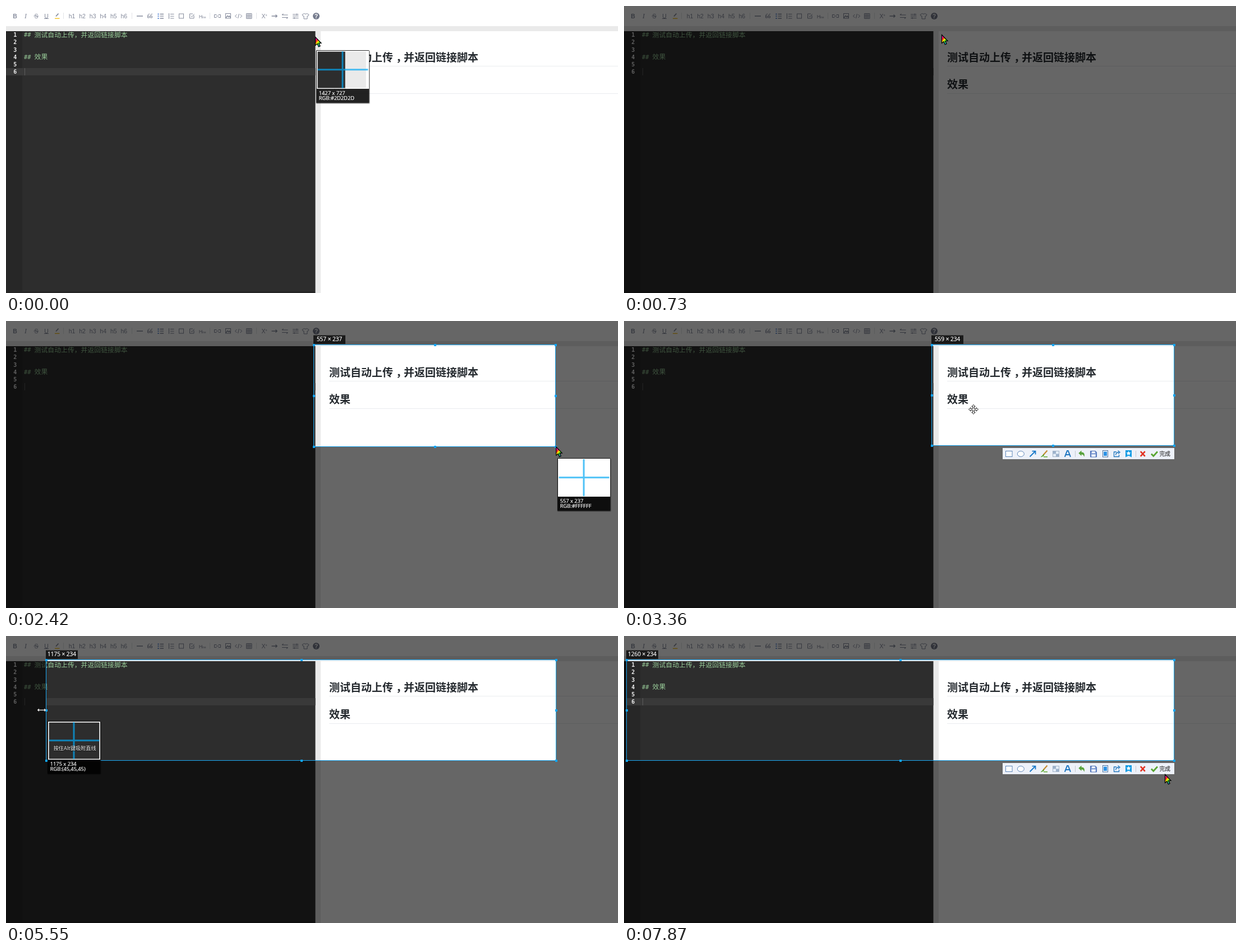
An HTML page for the animation above (7.99 s loop, 1091x513 px).

```html
<!DOCTYPE html>
<html lang="zh">
<head>
<meta charset="utf-8">
<title>Screenshot selection</title>
<style>
html, body { margin: 0; width: 100%; height: 100%; overflow: hidden; background: #fff; }
svg { display: block; }
text { white-space: pre; }
.cjk { font-family: "Noto Sans CJK SC", "Noto Sans CJK", sans-serif; }
.mono { font-family: "DejaVu Sans Mono", monospace; }
.ui { font-family: "Open Sans", sans-serif; fill: #fff; stroke: #fff; stroke-width: .2px; }
.tool { font-family: "Liberation Sans", sans-serif; font-size: 10.5px; fill: #858b9c; stroke: none; text-anchor: middle; }
</style>
</head>
<body>
<svg width="1091" height="513" viewBox="0 0 1091 513">
  <defs>
    <linearGradient id="rainbow" x1="0" y1="0" x2=".75" y2="1">
      <stop offset=".15" stop-color="#f0c"/><stop offset=".35" stop-color="#f22"/>
      <stop offset=".52" stop-color="#fe0"/><stop offset=".7" stop-color="#4e2"/>
      <stop offset=".92" stop-color="#09f"/>
    </linearGradient>
    <g id="arrow">
      <path d="M.5 .5V15.5L4 12.6L6.3 18L9 16.8L6.8 11.5H11Z" fill="url(#rainbow)" stroke="#000" stroke-width="1.2"/>
    </g>
    <g id="resize">
      <path d="M-8 0L-4.5 -3.2V-.8H4.5V-3.2L8 0L4.5 3.2V.8H-4.5V3.2Z" fill="#fff" stroke="#000" stroke-width=".4"/>
    </g>
    <g id="move" fill="#fff" stroke="#000" stroke-width=".9">
      <path d="M0 -8.5L3.2 -5H1.2V-1.2H5V-3.2L8.5 0L5 3.2V1.2H1.2V5H3.2L0 8.5L-3.2 5H-1.2V1.2H-5V3.2L-8.5 0L-5 -3.2V-1.2H-1.2V-5H-3.2Z"/>
    </g>
    <g id="actions">
      <rect x="675" y="227" width="306" height="20" fill="#edf1f9"/>
      <g fill="none" stroke="#5b84b8">
        <rect x="680.5" y="232.5" width="11.5" height="10" fill="#fff"/>
        <ellipse cx="707.3" cy="237.5" rx="6" ry="5" fill="#fff"/>
        <path d="M723.5 242.5L733 233M727.5 232.6H733.5V238.5" stroke="#1878c8" stroke-width="1.8"/>
        <path d="M754.5 231.5L747 240" stroke="#c58a32" stroke-width="2.2"/>
        <path d="M743.5 242.8L748.5 238.5L748 241Z" fill="#58a626" stroke="#58a626"/>
        <path d="M748 242.8H755" stroke="#58a626" stroke-width="1.4"/>
        <rect x="764.5" y="232.5" width="11" height="10" fill="#e4edf7" stroke="#a3b4c9"/>
        <path d="M765 233H770V237.5H765ZM770 237.5H775V242H770Z" fill="#9db2cc" stroke="none"/>
        <path d="M785.8 242.8L790 232H791.8L796 242.8M787.5 239H794.3" stroke="#2177c0" stroke-width="2"/>
        <path d="M804.5 232V243M912.5 232V243" stroke="#c3c8d0"/>
        <path d="M810.3 236.3L815.5 231.5V234.4C820 234.4 822 237.5 820.3 243C819.5 239.8 818.3 238.5 815.5 238.5V241.2Z" fill="#58a23c" stroke="none"/>
        <path d="M831.5 232.5H840.5L842.5 234.5V243H831.5Z" fill="#7e9bd2" stroke="#3f64b0"/>
        <path d="M834 233V236.2H839.5V233ZM833.5 238.5H840.5V242.5H833.5Z" fill="#fff" stroke="none"/>
        <rect x="853.5" y="231.5" width="9" height="11.5" fill="#fff" stroke="#476f9f"/>
        <rect x="855" y="233.5" width="6" height="7.5" fill="#2b91e5" stroke="none"/>
        <path d="M878 234H873.5V242.5H882.5V239" stroke="#2176bd" stroke-width="1.3"/>
        <path d="M876.5 239.5Q877 235 882 234.5M880.5 231.8L884 234.5L881 237.2" stroke="#2176bd" stroke-width="1.4"/>
        <path d="M894 231H905V243.5L899.5 240.7L894 243.5Z" fill="#0f9be4" stroke="none"/>
        <path d="M899.5 232.2L900.7 235L903.6 235.3L901.4 237.2L902.1 240L899.5 238.5L896.9 240L897.6 237.2L895.4 235.3L898.3 235Z" fill="#fff" stroke="none"/>
        <path d="M920.8 233.2L928.8 241.8M928.8 233.2L920.8 241.8" stroke="#e23222" stroke-width="2.6"/>
        <path d="M940 237.5L943.8 241.4L951 233.5" stroke="#58a632" stroke-width="2.8"/>
      </g>
      <text class="cjk" x="954.5" y="240.7" font-size="9.8" fill="#111">完成</text>
    </g>
  </defs>

  <rect width="1091" height="513" fill="#fff"/>
  <rect y="36" width="1091" height="9" fill="#eaeaea"/>
  <rect x="551" y="45" width="10" height="468" fill="#eaeaea"/>
  <rect y="45" width="551.5" height="468" fill="#2d2d2d"/>
  <rect y="45" width="29" height="468" fill="#272727"/>
  <path id="activeLine" fill="#393939"/>
  <rect y="510" width="551" height="3" fill="#262626"/>
  <path d="M33.5 111V124" stroke="#5c5c5c"/>
  <g id="lines" class="mono" font-size="10" font-weight="bold" fill="#ececec" text-anchor="middle"></g>
  <g id="code" fill="#99cc99"></g>
  <g class="cjk" font-size="19" font-weight="bold" fill="#24292e">
    <text x="576" y="99">测试自动上传<tspan dx="5">，</tspan><tspan dx="-5">并返回链接脚本</tspan></text>
    <text x="576" y="147">效果</text>
  </g>
  <path d="M576 107.5H1091M576 156.5H1091" stroke="#eaecef"/>

  <g id="toolbar" fill="none" stroke="#858b9c">
    <g id="labels"></g>
    <path d="M102.5 12V23M224.5 12V23M363.5 12V23M446.5 12V23" stroke="#e2e4e8"/>
    <path d="M49.5 18H58M68 22.5H76"/>
    <path d="M93.5 13.5L89 18.5" stroke-width="1.8"/><path d="M87 22.3H95.5" stroke="#f7c52c" stroke-width="1.5"/>
    <path d="M233 18H244" stroke-width="1.5"/>
    <path d="M256 14Q252.5 14.5 252.5 18V21H255.5V18H252.5M261 14Q257.5 14.5 257.5 18V21H260.5V18H257.5"/>
    <path d="M274.5 14.5H281M274.5 18.2H281M274.5 22H281" stroke-width="1.3"/>
    <path d="M270.5 14.5H272.5M270.5 18.2H272.5M270.5 22H272.5" stroke="#4f7fd0" stroke-width="1.8"/>
    <path d="M293 14.5H299.5M293 18.2H299.5M293 22H299.5M290.5 13V23" stroke-width="1.1"/>
    <rect x="308.5" y="14" width="8" height="8"/>
    <path d="M335 17V22H327.5V14H333M329.5 17.5L331.5 19.5L335.5 14.5"/>
    <path d="M375.5 15.5H371.5V20.5H375.5M378.5 15.5H382.5V20.5H378.5M374.5 18H379.5"/>
    <rect x="391.5" y="13.5" width="9" height="8.5"/><path d="M392 21L395 17.5L397 19.5L398.5 18L400 20.5" stroke-width="1.4"/>
    <path d="M411.5 15L408.5 18L411.5 21M417.5 15L420.5 18L417.5 21M415.5 14L413.5 22"/>
    <path d="M428.5 13.5H438V22.5H428.5ZM428.5 16.5H438M428.5 19.5H438M431.5 13.5V22.5M434.8 13.5V22.5"/>
    <path d="M473.5 18H483M480.5 15.5L483.2 18L480.5 20.5" stroke-width="1.4"/>
    <path d="M492 16H502.5M492 20.5H502.5M494.5 13.8L492 16M500 22.7L502.5 20.5M511 15H521.5M511 18H521.5M511 21.5H521.5M518.5 13.5V16.5M514 20V23" stroke-width="1.1"/>
    <path d="M531.5 13.5Q534 15.5 536.5 13.5L540 15.5L538.5 18H537V23H531V18H529.5L528 15.5Z"/>
    <circle cx="553" cy="18" r="6" fill="#757b8d" stroke="none"/>
    <text class="tool" x="553" y="21.8" style="fill:#fff;font-weight:bold">?</text>
  </g>

  <g id="overlay"></g>
</svg>
<script>
const LOOP = 7990, LEFT = 548.3, RIGHT = 981, TOP = 42.3, BOTTOM = 223.5, SCALE = 1.291;
const LAG = 70; // the frame trails the pointer by this many ms
const $ = id => document.getElementById(id);
const label = (x, text, style = "") => `<text class="tool" x="${x}" y="21.5" style="${style}">${text}</text>`;

$("labels").innerHTML =
  label(16, "B", "font-weight:bold") + label(35, "I", "font-style:italic;font-family:'Liberation Serif',serif;font-size:12px") +
  label(54, "S") + label(72, "U") +
  [1, 2, 3, 4, 5, 6].map(n => label(99 + n * 18.55, "h" + n)).join("") +
  label(347, "H", "font-size:9px") + label(353, "line", "font-size:4.5px") +
  label(459, "X") + label(464, "x", "font-size:6px;baseline-shift:4px");

const lineY = n => 42 + n * 13.2;
$("lines").innerHTML = [1, 2, 3, 4, 5, 6].map(n => `<text x="16.3" y="${lineY(n)}">${n}</text>`).join("");
$("code").innerHTML = [[1, "测试自动上传，并返回链接脚本"], [4, "效果"]].map(([n, text]) =>
  `<text class="mono" x="32" y="${lineY(n)}" font-size="10.3">##</text>
   <text class="cjk" x="50.6" y="${lineY(n) + .3}" font-size="11.87" font-weight="300">${text}</text>`).join("");

const STEPS = [0, 160, 290, 430, 580, 730, 880, 1000, 1120, 1240, 1360, 1510, 1640, 1760, 1890, 2020,
  2420, 2570, 2720, 2880, 3040, 3200, 3360, 3510, 3660, 3780, 3930, 4060,
  4460, 4610, 4730, 4850, 5000, 5130, 5280, 5400, 5550, 5700, 5860, 6020, 6170, 6320, 6470, 6620,
  7210, 7340, 7470, 7600, 7740, 7870];

// Keyframes: time, then values.
const HOVER = [[0, 551, 55], [580, 548, 43], [730, 566, 51]];
const CORNER = [[730, 566, 51], [1000, 810, 225], [1120, 880, 267], [1360, 925, 258.4],
  [1640, 957, 244], [2020, 976, 231], [2570, RIGHT, BOTTOM]];
const POINTER = [[2720, 978, 221], [3040, 745, 172], [3360, 623, 158], [4060, 549, 132]];
const EDGE = [[4400, LEFT, 132], [4610, 425, 132], [4730, 334.9, 132], [4850, 265, 132], [5130, 135, 132],
  [5400, 87, 132], [5860, 38, 133], [6470, 3, 134], [6620, 4.9, 136]];
const RETURN = [[7210, 30, 136], [7470, 500, 175], [7740, 930, 250], [7870, 964, 247]];

function at(track, t) {
  const next = track.findIndex(key => key[0] > t);
  if (next < 0) return track[track.length - 1].slice(1);
  if (next === 0) return track[0].slice(1);
  const a = track[next - 1], b = track[next], k = (t - a[0]) / (b[0] - a[0]);
  return a.slice(1).map((v, i) => v + (b[i + 1] - v) * k);
}

const rect = (x, y, w, h, fill, extra = "") =>
  `<rect x="${x}" y="${y}" width="${w}" height="${h}" fill="${fill}" ${extra}/>`;
const cursor = (kind, x, y) => `<use href="#${kind}" x="${x}" y="${y}"/>`;
const size = (w, h, sign) => `${Math.round(w * SCALE)} ${sign} ${Math.round(h * SCALE)}`;
const lightLine = from => $("activeLine").setAttribute("d", `M${from} 111H551.5V124H${from}Z`);

function selection(left, right, bottom) {
  const pixel = v => Math.floor(v) + .5;
  const l = pixel(left), r = pixel(right - .6), t = pixel(TOP), b = pixel(bottom - .6);
  const cx = pixel((l + r) / 2), cy = pixel((t + b) / 2);
  const handles = [[l, t], [cx, t], [r, t], [l, cy], [r, cy], [l, b], [cx, b], [r, b]];
  lightLine(l);
  return `<path d="M0 0H1091V513H0ZM${l} ${t}H${r}V${b}H${l}Z" fill-rule="evenodd" fill="#000" fill-opacity=".6"/>` +
    rect(l, t, r - l, b - t, "none", 'stroke="#1ba8f3"') +
    handles.map(([x, y]) => rect(x - 1.5, y - 1.5, 4, 4, "#12a5f5")).join("") +
    rect(l - .5, 25.5, 57, 15.5, "#000", 'fill-opacity=".74"') +
    `<text class="ui" x="${l + 28}" y="36.3" font-size="10" text-anchor="middle">${size(right - left, bottom - TOP, "×")}</text>`;
}

function magnifier(px, py, focus, caption, color, hint) {
  const x = Math.round(px), y = Math.round(py), zoom = 3.7;
  const cx = x + 47, cy = y + 34.8, left = x + 2.6, right = x + 92.4;
  const band = (from, to, fill) => {
    const a = Math.max(left, cx + (from - focus) * zoom), b = Math.min(right, cx + (to - focus) * zoom);
    return b > a ? rect(a, y + 2.6, b - a, 65, fill) : "";
  };
  return rect(x - .5, y + 1, 96.5, 95, "#000", 'fill-opacity=".25" rx="2"') +
    rect(x, y, 94.5, 94.5, "#000", 'fill-opacity=".82" rx="1"') +
    rect(x + 1, y + 1, 93, 68, "#fff") +
    band(-99, -1.2, "#f0f0f0") + band(-1.2, -.4, "#5c5c5c") +
    band(-.4, 29, "#272727") + band(29, 551, "#2d2d2d") + band(551, 561, "#eaeaea") +
    `<path d="M${cx} ${y + 2}V${cy - 1.5}M${cx} ${cy + 1.5}V${y + 68}M${left} ${cy}H${right}" stroke="#03a9f4" stroke-opacity=".7" stroke-width="3"/>` +
    (hint ? `<text class="cjk" x="${x + 10.7}" y="${y + 51.7}" font-size="9.2" font-weight="500" fill="#fff" style="text-shadow:0 0 1px #000,0 1px 1px #000">按住Alt键吸附直线</text>` : "") +
    `<text class="ui" x="${x + 4.7}" y="${y + 80.3}" font-size="9.3">${caption}</text>` +
    `<text class="ui" x="${x + 4.7}" y="${y + 89.3}" font-size="9.3">RGB:${color}</text>`;
}

function scene(t) {
  if (t < 880) {
    const [x, y] = at(HOVER, t), pressed = t >= 730;
    lightLine(pressed ? 551 : 0);
    return (pressed
      ? rect(0, 0, 1091, 513, "#000", 'fill-opacity=".6"')
      : magnifier(x + 2, y + 24, x - 1.3, "1427 x 727", "#2D2D2D")) + cursor("arrow", x, y);
  }
  if (t < 2720) {
    const [r, b] = at(CORNER, t), [x, y] = at(CORNER, t + LAG);
    return selection(LEFT, r, b) +
      magnifier(r + 3, b + 19.6, r, size(r - LEFT, b - TOP, "x"), "#FFFFFF") + cursor("arrow", x, y);
  }
  if (t < 4460) {
    const [x, y] = at(POINTER, t);
    return selection(LEFT, RIGHT, BOTTOM) + `<use href="#actions"/>` + cursor(x < 555 ? "resize" : "move", x, y);
  }
  if (t < 7210) {
    const [l, y] = at(EDGE, t), [lead] = at(EDGE, t + LAG);
    const shade = l < 29 ? 39 : 45;
    return selection(l, RIGHT, BOTTOM) +
      magnifier(l + 3, y + 20, l, size(RIGHT - l, BOTTOM - TOP, "x"), `(${shade},${shade},${shade})`, true) +
      cursor("resize", lead, y);
  }
  const [x, y] = at(RETURN, t);
  return selection(4.9, RIGHT, BOTTOM) + `<use href="#actions"/>` + cursor(y < BOTTOM ? "move" : "arrow", x, y);
}

let shown = -1;
const start = performance.now();
function frame() {
  const t = (performance.now() - start) % LOOP;
  const step = STEPS.filter(s => s <= t).pop();
  if (step !== shown) {
    $("overlay").innerHTML = scene(step);
    shown = step;
  }
  requestAnimationFrame(frame);
}
frame();
</script>
</body>
</html>
```
